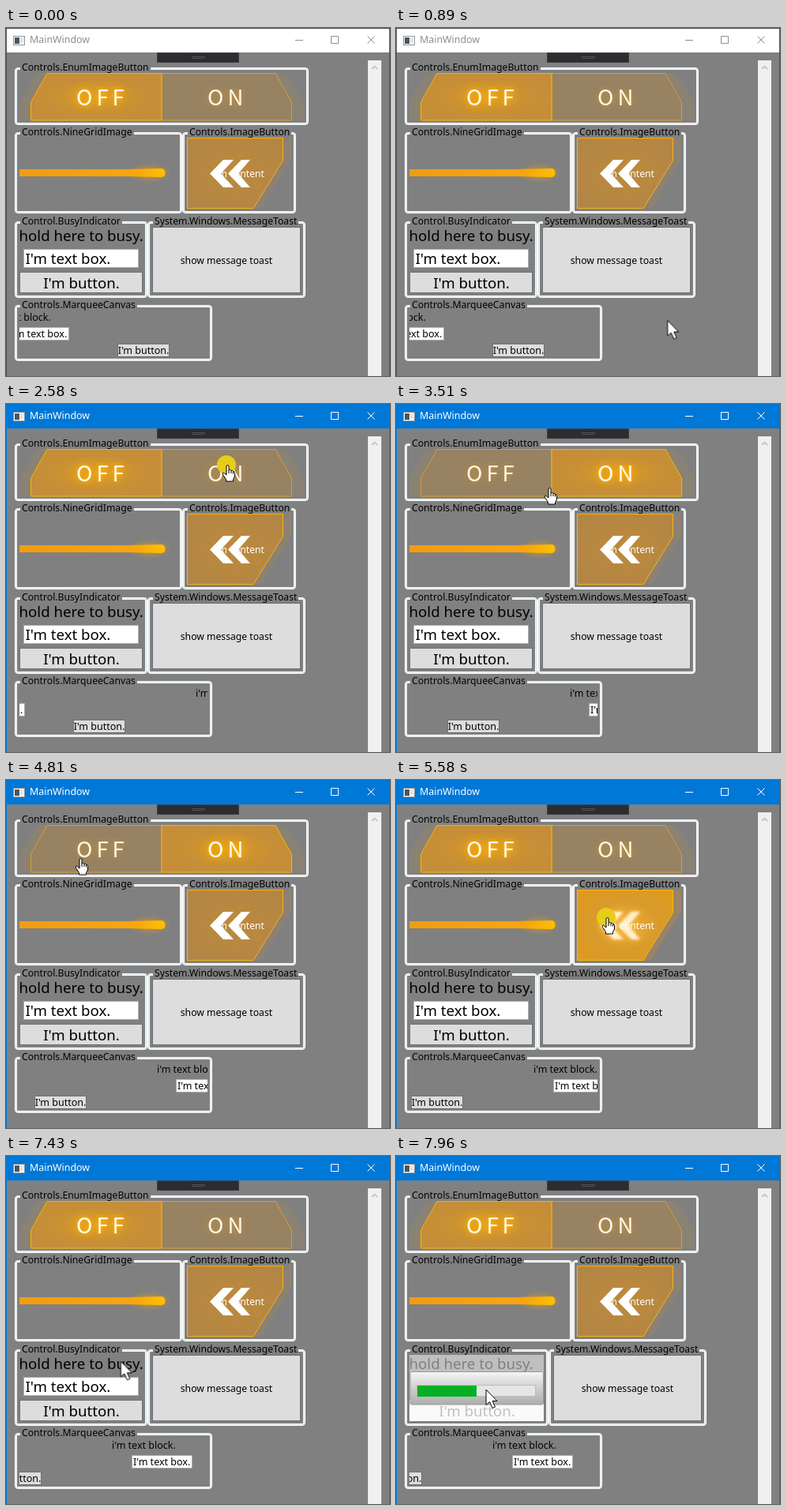
Recreate the animation shown at these times as an HTML page. Size 486 by 441 pixels, loop 8 s.

```html
<!DOCTYPE html>
<html lang="en">
<head>
<meta charset="utf-8">
<title>MainWindow</title>
<style>
  html, body { margin: 0; width: 100%; height: 100%; overflow: hidden; background: #808080; }
  body { position: relative; font: 12.2px/16px "Noto Sans", "Open Sans", sans-serif; color: #000; }

  /* One shared 8 s timeline; states switch hard, movement is interpolated. */
  .title, .edge, .step { animation: 8s step-end infinite; }
  .move { animation: 8s linear infinite; }

  .title { position: absolute; inset: 0 0 auto; height: 31px; animation-name: activate; }
  .title span { position: absolute; left: 30px; top: 7px; font-size: 12.4px; }
  .title svg { position: absolute; left: 0; top: 0; }
  .edge { position: absolute; left: 0; top: 0; width: 1px; height: 441px; animation-name: edge; }
  .edge.right { left: 485px; }
  .edge.top { width: 486px; height: 1px; }
  @keyframes activate {
    0% { background-color: #fff; color: #8f8f8f; }
    26.9%, to { background-color: #0078d7; color: #fff; }
  }
  @keyframes edge {
    0% { background-color: #4d4d55; }
    26.9%, to { background-color: #0078d7; }
  }

  .group {
    position: absolute; box-sizing: border-box; border: 1px solid #fff; border-radius: 4px;
    box-shadow: inset 0 0 0 1px #d5dfe5, inset 0 0 0 2px #fff;
  }
  .group span { position: absolute; left: 6px; top: -9px; padding: 0 2px; background: #808080; white-space: nowrap; }
  .busyBox { animation-name: widen; }
  .toastBox { animation-name: push; }
  @keyframes widen { 0% { width: 168px; } 96.75%, to { width: 182px; } }
  @keyframes push { 0% { transform: none; } 96.75%, to { transform: translateX(14px); } }

  .stage { position: absolute; left: 0; top: 0; }
  .mid { text-anchor: middle; }
  .big { font-size: 18.67px; }
  .button { fill: #ddd; stroke: #707070; }
  .field { fill: #fff; stroke: #abadb3; }

  .caption {
    font: 500 27.5px "Noto Sans CJK SC", "Noto Sans CJK JP", "Noto Sans", sans-serif; letter-spacing: 5px;
    fill: #fff8ea; filter: drop-shadow(0 0 4px #d99a2c);
  }
  .dim path { fill: #978262; stroke: #d99f2c; }
  .lit path { fill: url(#lit); stroke: #ffb400; }
  .lit .caption { fill: #fffdf2; filter: drop-shadow(0 0 2px #ffb400) drop-shadow(0 0 6px #ffae00); }

  .pickOff { animation-name: pickOff; }
  .pickOn { animation-name: pickOn; }
  @keyframes pickOff { 0% { opacity: 1; } 33.75% { opacity: 0; } 62.9%, to { opacity: 1; } }
  @keyframes pickOn { 0% { opacity: 0; } 33.75% { opacity: 1; } 62.9%, to { opacity: 0; } }

  .cool { animation-name: cool; }
  .hot { animation-name: hot; }
  .hot .arrows { fill: #fff0cf; filter: blur(1.4px) drop-shadow(0 0 5px #ffc23c); }
  @keyframes cool { 0% { opacity: 1; } 67.5% { opacity: 0; } 88%, to { opacity: 1; } }
  @keyframes hot { 0% { opacity: 0; } 67.5% { opacity: 1; } 88%, to { opacity: 0; } }

  .idle { animation-name: idle; }
  .busy { animation-name: busy; }
  .progress { transform-origin: 27px 0; animation-name: progress; }
  @keyframes idle { 0% { opacity: 1; } 96.75%, to { opacity: 0; } }
  @keyframes busy { 0% { opacity: 0; } 96.75%, to { opacity: 1; } }
  @keyframes progress { 0%, 96.75% { transform: scaleX(0); } 99.5%, to { transform: none; } }

  /* Marquee items advance by whole pixels. */
  .slideText { animation-name: slideText; }
  .slideField { animation-name: slideField; }
  .slideButton { animation-name: slideButton; }
  @keyframes slideText {
    0% { transform: translateX(-23px); animation-timing-function: steps(41, start); }
    23.5% { transform: translateX(-64px); }
    23.501% { transform: translateX(256px); animation-timing-function: steps(134, start); }
    to { transform: translateX(122px); }
  }
  @keyframes slideField {
    0% { transform: translateX(4px); animation-timing-function: steps(65, start); }
    37% { transform: translateX(-61px); }
    37.001% { transform: translateX(256px); animation-timing-function: steps(109, start); }
    to { transform: translateX(147px); }
  }
  @keyframes slideButton {
    0% { transform: translateX(142px); animation-timing-function: steps(175, start); }
    to { transform: translateX(-33px); }
  }

  .cursor { animation-name: travel; }
  .cursor path { fill: #fff; stroke: #000; stroke-linejoin: round; }
  .pointer { animation-name: pointer; }
  .hand { animation-name: hand; }
  .press { fill: #e8cc1a; animation-name: press; }
  @keyframes travel {
    0%, 10.2% { transform: translate(339px, 397px); }
    14% { transform: translate(358px, 290px); }
    20.7%, 34% { transform: translate(281px, 77px); }
    42%, 44.2% { transform: translate(195px, 106px); }
    52.5% { transform: translate(58px, 100px); }
    59.5%, 63.8% { transform: translate(95px, 99px); }
    68.3%, 73% { transform: translate(268px, 174px); }
    84%, 86.3% { transform: translate(243px, 149px); }
    95%, to { transform: translate(114px, 296px); }
  }
  @keyframes pointer {
    0% { opacity: 0; } 10.2% { opacity: 1; } 19.4% { opacity: 0; }
    64.6% { opacity: 1; } 67% { opacity: 0; } 88%, to { opacity: 1; }
  }
  @keyframes hand {
    0% { opacity: 0; } 19.4% { opacity: 1; }
    64.6% { opacity: 0; } 67% { opacity: 1; } 88%, to { opacity: 0; }
  }
  @keyframes press {
    0% { opacity: 0; } 26.9% { opacity: 1; } 33.1% { opacity: 0; }
    61% { opacity: 1; } 62.9% { opacity: 0; }
    68.1% { opacity: 1; } 86.3%, to { opacity: 0; }
  }
</style>
</head>
<body>
  <div class="title">
    <svg width="486" height="31" fill="none" stroke="currentColor">
      <rect x="9.5" y="10.5" width="14" height="11" fill="#fff" stroke="#8a939a"/>
      <rect x="11" y="12" width="6" height="8" fill="#4c555c" stroke="none"/>
      <path d="M18 13.5H22M18 15.5H22M18 17.5H22" stroke="#c3cacf"/>
      <path d="M366 15.5H376M411.5 10.5H420.5V19.5H411.5ZM457.5 10.5L466.5 19.5M466.5 10.5L457.5 19.5"/>
    </svg>
    <span>MainWindow</span>
  </div>
  <div class="edge"></div>
  <div class="edge right"></div>
  <div class="edge top"></div>

  <div class="group" style="left:11px;top:50px;width:372px;height:73px"><span>Controls.EnumImageButton</span></div>
  <div class="group" style="left:11px;top:132px;width:212px;height:103px"><span>Controls.NineGridImage</span></div>
  <div class="group" style="left:223px;top:132px;width:144px;height:103px"><span>Controls.ImageButton</span></div>
  <div class="group step busyBox" style="left:11px;top:245px;height:97px"><span>Control.BusyIndicator</span></div>
  <div class="group step toastBox" style="left:179px;top:245px;width:200px;height:97px"><span>System.Windows.MessageToast</span></div>
  <div class="group" style="left:11px;top:351px;width:250px;height:71px"><span>Controls.MarqueeCanvas</span></div>

  <svg class="stage" width="486" height="441">
    <defs>
      <radialGradient id="lit" r=".6">
        <stop offset="0" stop-color="#dc9c24"/>
        <stop offset=".6" stop-color="#c78f36"/>
        <stop offset="1" stop-color="#c58d38"/>
      </radialGradient>
      <radialGradient id="plate" r=".75">
        <stop offset="0" stop-color="#bd8a3c"/>
        <stop offset="1" stop-color="#b08548"/>
      </radialGradient>
      <radialGradient id="plateHot" r=".7">
        <stop offset="0" stop-color="#eeb03a"/>
        <stop offset=".5" stop-color="#d89a2a"/>
        <stop offset="1" stop-color="#e09a1c"/>
      </radialGradient>
      <linearGradient id="beam">
        <stop offset="0" stop-color="#f09c12"/>
        <stop offset=".8" stop-color="#f7a60c"/>
        <stop offset="1" stop-color="#ffc000"/>
      </linearGradient>
      <radialGradient id="glow">
        <stop offset="0" stop-color="#f0a010" stop-opacity=".6"/>
        <stop offset="1" stop-color="#f0a010" stop-opacity="0"/>
      </radialGradient>
      <linearGradient id="panel" x2="0" y2="1">
        <stop offset="0" stop-color="#f6f6f6"/>
        <stop offset=".45" stop-color="#d2d2d2"/>
        <stop offset="1" stop-color="#adadad"/>
      </linearGradient>
      <clipPath id="lane"><rect x="17" y="357" width="238" height="62"/></clipPath>
      <path id="plateShape" d="M229.5 139.5H350.5V168L313 228.5H229.5Z"/>
      <path id="wing" d="M351 139H361V166L323 229H313L351 168Z"/>
      <path id="chevrons" d="M258 184.5L275 167H288L272 184.5L288 202H275ZM281 184.5L298 167H309L294 184.5L309 202H298Z"/>
    </defs>

    <rect x="191.5" y="31.5" width="103" height="12" fill="#2d2d30" stroke="#3f3f46"/>
    <path d="M235 36.5H252M236 38.5H252" stroke="#77777b" stroke-dasharray="1 1"/>
    <rect x="458" y="41" width="17" height="400" fill="#f0f0f0"/>
    <path d="M463 52L466.5 48.5L470 52" fill="none" stroke="#bcbcbc" stroke-width="1.5"/>

    <path d="M17 117V94L39 57H354L377 94V117Z" fill="#d09030" opacity=".13"/>
    <g class="step pickOff">
      <g class="dim"><path d="M197 57.5H341L361.5 94V117H197Z"/><text class="caption" x="255" y="98">ON</text></g>
      <g class="lit"><path d="M52 57.5H197V117H31.5V94Z"/><text class="caption" x="89" y="98">OFF</text></g>
    </g>
    <g class="step pickOn">
      <g class="dim"><path d="M52 57.5H197V117H31.5V94Z"/><text class="caption" x="89" y="98">OFF</text></g>
      <g class="lit"><path d="M197 57.5H341L361.5 94V117H197Z"/><text class="caption" x="255" y="98">ON</text></g>
    </g>

    <ellipse cx="182" cy="183.5" rx="28" ry="13" fill="url(#glow)"/>
    <path d="M17 179H150L196 178Q201.5 178 201.5 183.5T196 189L150 188H17Z" fill="url(#beam)"/>

    <g class="step cool">
      <use href="#wing" fill="#d09030" opacity=".16"/>
      <use href="#plateShape" fill="url(#plate)" stroke="#f9b112"/>
      <use href="#chevrons" fill="#fff"/>
    </g>
    <g class="step hot">
      <use href="#wing" fill="#d09030" opacity=".3"/>
      <use href="#plateShape" fill="url(#plateHot)" stroke="#ffb800"/>
      <use class="arrows" href="#chevrons"/>
    </g>
    <text class="mid" x="295" y="189" font-weight="500" fill="#fff">i'm content</text>

    <g class="step idle">
      <text class="big" x="16.5" y="270">hold here to busy.</text>
      <rect class="field" x="22.5" y="280.5" width="145" height="23"/>
      <text class="big" x="24.5" y="299">I'm text box.</text>
      <rect class="button" x="17.5" y="309.5" width="155" height="26"/>
      <text class="big mid" x="95.5" y="330">I'm button.</text>
    </g>
    <g class="step busy">
      <rect x="17" y="252" width="170" height="84" fill="#bfbfbf"/>
      <text class="big" x="16.5" y="270" fill="#808080">hold here to busy.</text>
      <rect x="17" y="309" width="170" height="27" fill="#fafafa"/>
      <text class="big mid" x="102.5" y="330" fill="#c1c1c1">I'm button.</text>
      <rect x="18" y="273.5" width="168.5" height="41.5" rx="2" fill="url(#panel)" stroke="#9b9b9b"/>
      <rect x="26.5" y="290.5" width="150" height="14" fill="#e6e6e6" stroke="#bcbcbc"/>
      <rect class="move progress" x="27" y="291" width="75" height="14" fill="#06b025"/>
    </g>

    <g class="step toastBox">
      <rect class="button" x="185.5" y="252.5" width="187" height="83"/>
      <text class="mid" x="279" y="299">show message toast</text>
    </g>

    <g clip-path="url(#lane)" font-size="12.5">
      <text class="move slideText" y="371">i'm text block.</text>
      <g class="move slideField">
        <rect class="field" x=".5" y="379.5" width="76" height="16"/>
        <text x="2" y="392">I'm text box.</text>
      </g>
      <g class="move slideButton">
        <rect class="button" x=".5" y="400.5" width="65" height="16"/>
        <text class="mid" x="33" y="413">I'm button.</text>
      </g>
    </g>

    <g class="move cursor">
      <circle class="step press" cx="-2" cy="0" r="12"/>
      <path class="step pointer" d="M0 0V19.5L4.5 15.5L8 23.5L11.500 22L8 14.5H14Z"/>
      <g class="step hand">
        <path d="M-2 2Q-2 .5 -.5 .5T1 2V7Q2.5 5.5 4 7.5Q5.5 6.5 6.5 8.5Q8.5 8 8.5 10.5V15L6.5 18.5V21H-2.5V18.5L-6.5 12.5Q-7.5 10 -5.5 10L-2 13Z"/>
        <path d="M1 7V11M4 8V11M6.5 9V11.5" fill="none"/>
      </g>
    </g>
  </svg>
</body>
</html>
```
